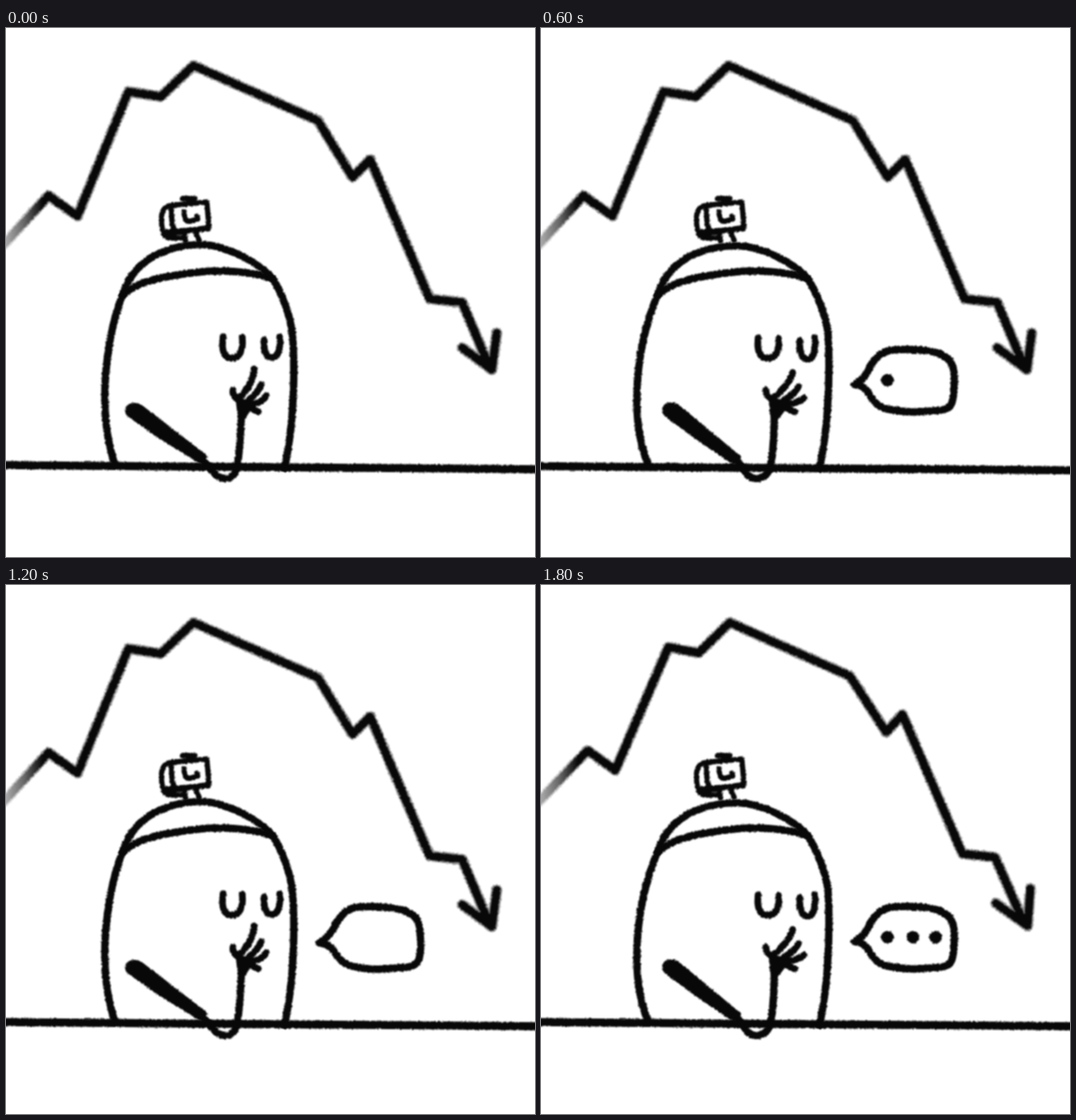
Animation, 748 px wide and 748 px high, one loop 2 s. Source, as an HTML page:

```html
<!DOCTYPE html>
<html lang="en">
<head>
<meta charset="utf-8">
<title>Downward chart</title>
<style>
  html, body { margin: 0; width: 100%; height: 100%; overflow: hidden; background: #fff; }
  svg { display: block; width: 100vw; height: 100vh; }
  .ink { fill: none; stroke: #080808; stroke-width: 10.5; stroke-linecap: round; stroke-linejoin: round; filter: url(#brush); }
  .trend { stroke: url(#fade); }
  .line { stroke-width: 11; }
  .shade { stroke-width: 15.5; opacity: .45; }
  .lamp { stroke-width: 7.5; }
  .fine { stroke-width: 9.5; }
  .arm { fill: #080808; stroke-width: 3; }
  .palm, .dot { fill: #080808; stroke: none; }
  .table { stroke-width: 11.5; }

  /* One drawing per 200 ms step, ten steps per loop */
  .pose { animation: 2s step-end infinite; }
  .chart-a { animation-name: chart-a; }
  .chart-b { animation-name: chart-b; }
  .chart-c { animation-name: chart-c; }
  .even { animation-name: even; }
  .odd { animation-name: odd; }
  .table-a { animation-name: table-a; }
  .table-b { animation-name: table-b; }
  .talk { animation-name: talk; }
  .dot-1 { animation-name: dot-1; }
  .dot-2 { animation-name: dot-2; }
  .dot-3 { animation-name: dot-3; }

  @keyframes chart-a { 0%, 30%, 60% { opacity: 1 } 10%, 40%, 70%, 100% { opacity: 0 } }
  @keyframes chart-b { 0%, 20%, 50%, 80% { opacity: 0 } 10%, 40%, 70%, 90%, 100% { opacity: 1 } }
  @keyframes chart-c { 0%, 30%, 60%, 90%, 100% { opacity: 0 } 20%, 50%, 80% { opacity: 1 } }
  @keyframes even { 0%, 20%, 40%, 60%, 80% { opacity: 1 } 10%, 30%, 50%, 70%, 90%, 100% { opacity: 0 } }
  @keyframes odd { 0%, 20%, 40%, 60%, 80% { opacity: 0 } 10%, 30%, 50%, 70%, 90%, 100% { opacity: 1 } }
  @keyframes table-a { 0%, 20%, 40%, 60%, 90%, 100% { opacity: 1 } 10%, 30%, 50%, 80% { opacity: 0 } }
  @keyframes table-b { 0%, 20%, 40%, 60%, 90%, 100% { opacity: 0 } 10%, 30%, 50%, 80% { opacity: 1 } }
  @keyframes talk { 0% { opacity: 0 } 20%, 100% { opacity: 1 } }
  @keyframes dot-1 { 0%, 60% { opacity: 0 } 30%, 70%, 100% { opacity: 1 } }
  @keyframes dot-2 { 0%, 60% { opacity: 0 } 40%, 80%, 100% { opacity: 1 } }
  @keyframes dot-3 { 0%, 60% { opacity: 0 } 50%, 90%, 100% { opacity: 1 } }
</style>
</head>
<body>
<svg viewBox="0 0 748 748">
  <defs>
    <filter id="brush" filterUnits="userSpaceOnUse" x="-20" y="-20" width="788" height="788" color-interpolation-filters="sRGB">
      <feTurbulence type="fractalNoise" baseFrequency=".35" numOctaves="2" seed="4" result="grain"/>
      <feDisplacementMap in="SourceGraphic" in2="grain" scale="3.5" xChannelSelector="R" yChannelSelector="G"/>
      <feGaussianBlur stdDeviation="1"/>
    </filter>
    <linearGradient id="fade" gradientUnits="userSpaceOnUse" x1="0" y1="0" x2="52" y2="0">
      <stop offset="0" stop-color="#a8a8a8"/>
      <stop offset=".5" stop-color="#666"/>
      <stop offset="1" stop-color="#080808"/>
    </linearGradient>
    <path id="trend-a" d="M-6 309 L60 237 L101 266 L173 90 L219 97 L265 53 L441 131 L490 211 L515 186 L599 383 L645 388 L683 478 M645 452 L687 483 L694 431"/>
    <path id="trend-b" d="M-6 309 L66 234 L105 262 L180 88 L223 96 L267 53 L437 129 L488 208 L511 183 L596 380 L642 385 L683 478 M643 450 L688 482 L692 429"/>
    <path id="trend-c" d="M-6 309 L63 236 L102 264 L176 90 L220 97 L266 53 L440 130 L489 210 L513 184 L598 382 L644 387 L683 478 M644 451 L687 482 L693 430"/>
  </defs>

  <rect width="748" height="748" fill="#fff"/>

  <g class="pose chart-a"><g class="ink trend">
    <use href="#trend-a" class="shade"/><use href="#trend-a" class="line"/>
  </g></g>
  <g class="pose chart-b"><g class="ink trend">
    <use href="#trend-b" class="shade"/><use href="#trend-b" class="line"/>
  </g></g>
  <g class="pose chart-c"><g class="ink trend">
    <use href="#trend-c" class="shade"/><use href="#trend-c" class="line"/>
  </g></g>

  <!-- Head lamp and hat brim -->
  <g class="ink">
    <path class="lamp" d="M250 241 H267 M258 241 V248 M232 251 L284 246 L287 282 L231 291 M232 251 C221 254 219 263 220 276 C221 290 224 297 232 297 L249 297 M234 253 C233 266 235 279 239 290 M228 288 L286 284 M252 290 L254 301 M268 288 L273 300"/>
    <path class="lamp" d="M252 260 C252 270 254 274 261 273 L271 270 L270 266"/>
    <path d="M166 377 C186 357 232 349 285 344 C320 342 350 346 376 354"/>
  </g>

  <g class="pose even"><g class="ink">
    <path d="M154 618 C142 580 139 550 140 505 C143 450 152 410 165 377 C173 352 190 331 216 319 C243 307 278 301 307 312 C335 320 361 337 377 354 C392 378 403 411 405 434 C408 470 407 510 405 540 C403 575 398 602 394 622"/>
    <path class="fine" d="M307 436 C304 455 308 467 319 467 C331 467 336 455 334 437 M365 441 C364 457 368 466 376 466 C385 466 389 452 387 437"/>
    <path class="arm" d="M170 541 C170 531 183 529 192 535 L284 606 L275 615 L211 575 L176 550 Q170 547 170 541Z"/>
    <path d="M278 611 C290 622 296 637 310 637 C324 637 327 625 329 605 C331 585 332 570 333 545"/>
    <path class="fine" d="M351 482 C349 500 341 511 331 522 M321 512 C319 522 328 523 336 531 M361 504 C356 517 347 523 338 530 M368 520 C362 530 352 531 342 534 M357 543 L341 535"/>
    <path class="palm" d="M325 528 L344 523 L354 534 L345 541 L339 553 L328 553Z"/>
  </g></g>

  <g class="pose odd"><g class="ink">
    <path d="M151 617 C138 582 134 550 136 505 C139 455 150 412 165 377 C173 352 190 332 216 320 C243 309 278 303 307 313 C335 321 361 337 377 354 C392 378 404 411 406 434 C408 470 407 510 405 540 C403 575 398 602 394 622"/>
    <path class="fine" d="M307 438 C305 456 309 467 320 467 C332 467 338 456 336 439 M366 442 C365 459 369 468 377 468 C386 468 389 453 387 438"/>
    <path class="arm" d="M173 540 C173 530 186 528 195 535 L282 607 L272 616 L211 574 L179 550 Q173 547 173 540Z"/>
    <path d="M276 611 C287 621 290 637 304 637 C320 637 325 625 327 605 C329 585 330 570 330 545"/>
    <path class="fine" d="M356 487 C351 503 340 513 329 523 M318 512 C318 523 327 523 335 531 M364 507 C358 519 347 524 337 530 M372 523 C364 531 352 531 342 534 M359 543 L341 534"/>
    <path class="palm" d="M322 527 L344 523 L355 534 L345 541 L336 553 L325 553Z"/>
  </g></g>

  <g class="pose table-a"><path class="ink table" d="M-10 618 L758 624"/></g>
  <g class="pose table-b"><path class="ink table" d="M-10 619.5 L758 625.5"/></g>

  <g class="pose talk">
    <g class="pose even"><path class="ink" d="M443 506 C455 498 463 489 467 478 C475 465 483 458 494 456 C520 453 548 456 562 460 C577 465 585 474 585 488 C587 505 587 518 584 529 C580 541 566 541 547 542 C522 545 500 542 486 538 C471 533 467 521 460 513 C455 508 449 507 443 506Z"/></g>
    <g class="pose odd"><path class="ink" d="M443 504 C455 498 462 488 466 477 C474 465 482 458 493 456 C520 453 548 455 562 460 C576 465 583 474 584 488 C585 505 584 520 581 530 C577 541 564 541 545 542 C520 545 500 541 486 538 C471 533 467 521 460 512 C455 506 449 505 443 504Z"/></g>
    <g class="pose dot-1"><circle class="ink dot" cx="490" cy="498" r="9"/></g>
    <g class="pose dot-2"><circle class="ink dot" cx="526" cy="498" r="9"/></g>
    <g class="pose dot-3"><circle class="ink dot" cx="558" cy="498" r="9"/></g>
  </g>
</svg>
</body>
</html>
```
